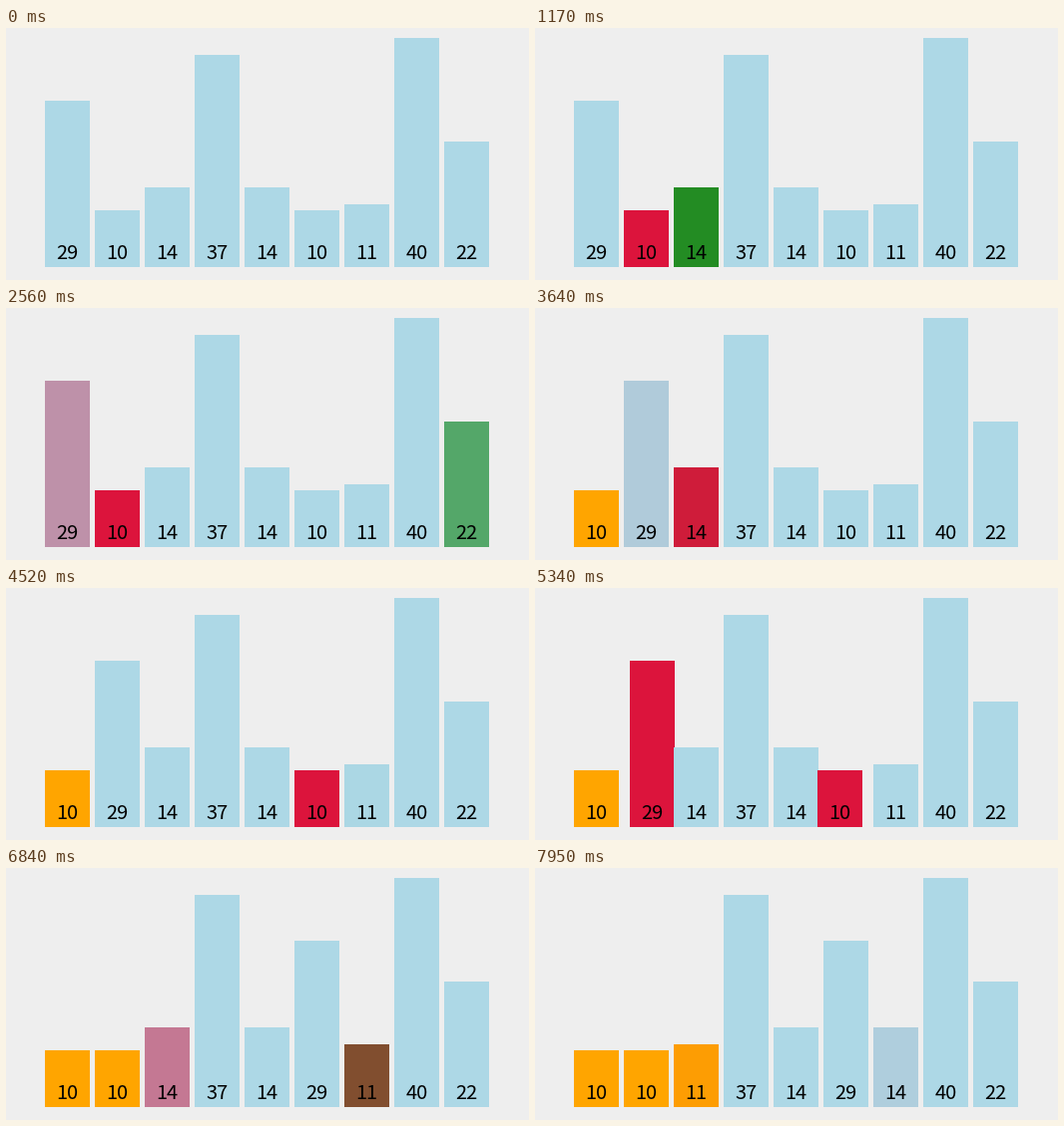
Write a matplotlib script that moves like this. It is 524 px wide and 253 px high and loops after 8000 ms.

```python
import numpy as np
import matplotlib.pyplot as plt
from matplotlib.animation import FuncAnimation
from matplotlib.colors import to_rgb
from matplotlib.patches import Rectangle

WIDTH, HEIGHT = 524, 253
DPI = 64  # a power of two keeps the pixel size exact
LOOP_MS, INTERVAL_MS = 8000, 20
START_MS, STEP_MS = 500, 68.3

VALUES = [29, 10, 14, 37, 14, 10, 11, 40, 22]
LEFT, PITCH, BAR_WIDTH, BASE, UNIT = 39, 50, 45, 240, 5.75
PLAIN, COMPARED, SMALLEST, SORTED = map(
    to_rgb, ("lightblue", "forestgreen", "crimson", "orange"))

# Start times of some sorting steps; the others lie evenly between them.
STEP_NUMBERS = [1, 4, 11, 16, 25, 32, 37, 38]
STEP_TIMES = [420, 1000, 2456, 3492, 5309, 6747, 7789, 7993]


def selection_sort_states(values):
    """List (slots, colors) per bar for every step of a selection sort."""
    count = len(values)
    order = list(range(count))
    states = []

    def record(done, marks):
        slots, colors = np.zeros(count), np.zeros((count, 3))
        for slot, bar in enumerate(order):
            slots[bar] = slot
            colors[bar] = marks.get(slot, SORTED if slot < done else PLAIN)
        states.append((slots, colors))

    record(0, {})
    for i in range(count - 1):
        low = i
        record(i, {low: SMALLEST})
        for j in range(i + 1, count):
            record(i, {low: SMALLEST, j: COMPARED})
            if values[order[j]] < values[order[low]]:
                low = j
                record(i, {low: SMALLEST})
        if low != i:
            pair = {i: SMALLEST, low: SMALLEST}
            record(i, pair)
            order[i], order[low] = order[low], order[i]
            record(i, pair)
        record(i + 1, {})
    return states


def ease(p):
    return 4 * p**3 if p < 0.5 else 1 - 4 * (1 - p)**3


STATES = selection_sort_states(VALUES)

fig = plt.figure(figsize=(WIDTH / DPI, HEIGHT / DPI), dpi=DPI,
                 facecolor="#eeeeee")
ax = fig.add_axes([0, 0, 1, 1])
ax.set(xlim=(0, WIDTH), ylim=(HEIGHT, 0))
ax.axis("off")

bars, labels = [], []
for n, value in enumerate(VALUES):
    height = value * UNIT
    bars.append(ax.add_patch(Rectangle(
        (0, BASE - height), BAR_WIDTH, height, linewidth=0, zorder=2 * n)))
    labels.append(ax.text(
        0, 232, str(value), ha="center", va="baseline", color="black",
        family="Noto Sans CJK JP", fontsize=20 * 72 / DPI, zorder=2 * n + 1))


def state_at(ms):
    if ms < START_MS:
        return STATES[0]
    # Motion advances in ticks of about fifteen per second.
    tick = (ms - START_MS + 30) // STEP_MS
    step = np.interp(START_MS + tick * STEP_MS, STEP_TIMES, STEP_NUMBERS)
    k = int(step)
    blend = ease(step - k)
    return [a + (b - a) * blend for a, b in zip(STATES[k - 1], STATES[k])]


def update(frame):
    slots, colors = state_at(frame * INTERVAL_MS)
    for bar, label, slot, color in zip(bars, labels, slots, colors):
        x = LEFT + PITCH * slot
        bar.set_x(x)
        bar.set_facecolor(tuple(color))
        label.set_x(x + BAR_WIDTH / 2)
    return bars + labels


update(0)
anim = FuncAnimation(fig, update, frames=LOOP_MS // INTERVAL_MS,
                     interval=INTERVAL_MS, repeat=True, repeat_delay=0)
plt.show()
```
